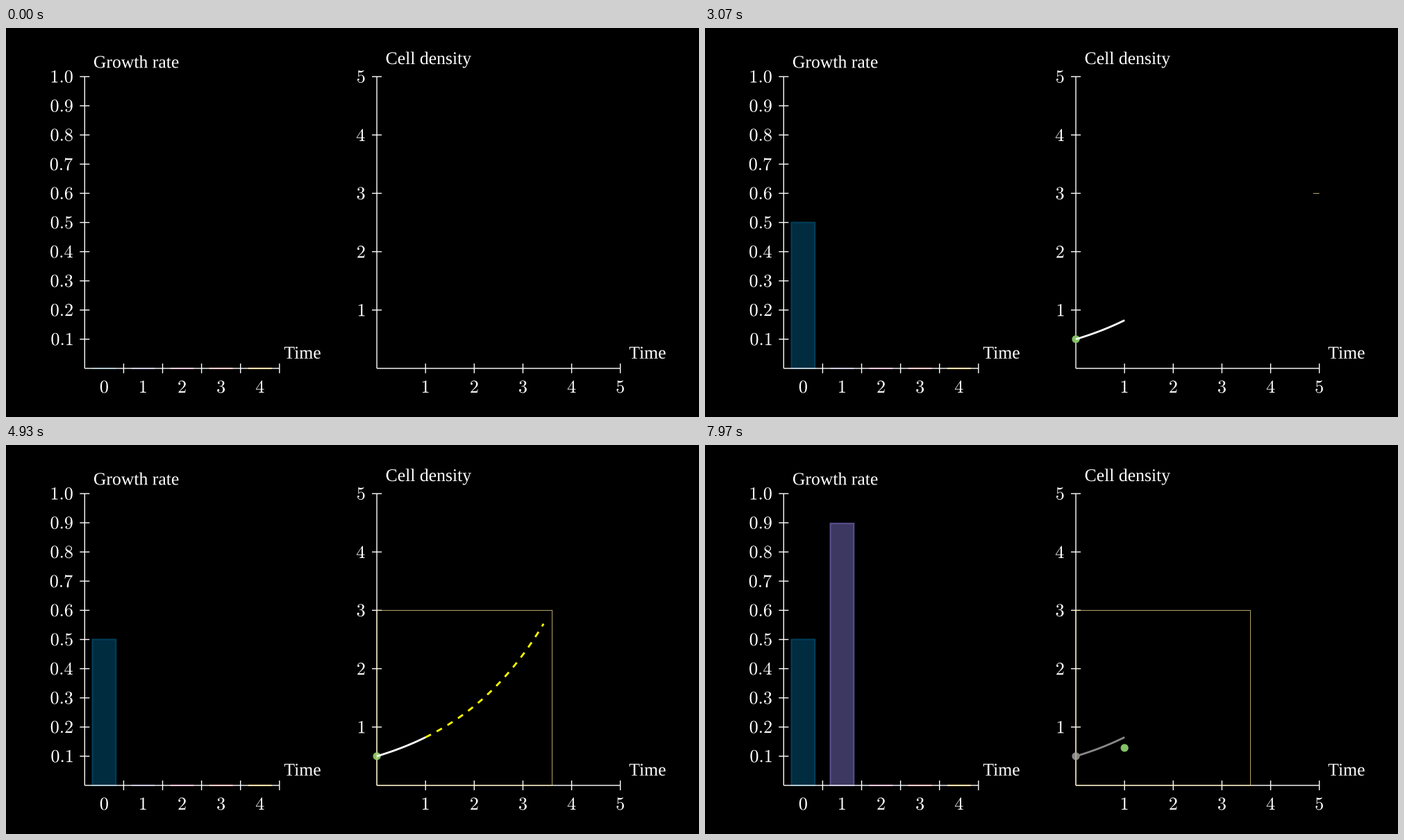
A matplotlib script for the animation above (8000 ms loop, 998 by 561 pixels).

```python
import numpy as np
import matplotlib.pyplot as plt
from matplotlib.animation import FuncAnimation
from matplotlib.collections import LineCollection
from matplotlib.colors import to_rgb
from matplotlib.patches import Circle, PathPatch, Rectangle
from matplotlib.path import Path
from matplotlib.textpath import TextPath

plt.rcParams["mathtext.fontset"] = "cm"

W, H, DPI = 998, 561, 100
UNIT = H / 8                      # one scene unit in pixels
FPS, SECONDS = 30, 8
GREEN, GREY, YELLOW, PALE = "#83C167", "#888888", "#FFFF00", "#FFEA94"
BAR_COLORS = ["#003f5c", "#58508d", "#bc5090", "#ff6361", "#ffa600"]

BASE, TOP = H / 2 + 3 * UNIT, H / 2 - 3 * UNIT
LEFT, RIGHT = W / 2 - 5.5 * UNIT, W / 2 + 0.5 * UNIT
BAR_STEP = 4 * UNIT / 5
RATE, START, LIMIT = 0.5, 0.5, 3
T_END = np.log(LIMIT / START) / RATE   # time at which the density reaches LIMIT

fig = plt.figure(figsize=(W / DPI, H / DPI), dpi=DPI, facecolor="black")
ax = fig.add_axes([0, 0, 1, 1])
ax.set_xlim(0, W)
ax.set_ylim(H, 0)
ax.axis("off")


def stroke(width):
    """Scene stroke width to points."""
    return width * 0.01 * UNIT * 72 / DPI


def smooth(t):
    def sig(x):
        return 1 / (1 + np.exp(-x))
    t = np.clip(t, 0, 1)
    edge = sig(-5)
    return np.clip((sig(10 * (t - 0.5)) - edge) / (1 - 2 * edge), 0, 1)


def plot_xy(t, n):
    """Pixel position in the density chart."""
    return RIGHT + UNIT * np.asarray(t), BASE - 6 * UNIT / 5 * np.asarray(n)


def density(t):
    return START * np.exp(RATE * np.asarray(t))


def mix(a, b, k):
    return tuple((1 - k) * np.array(to_rgb(a)) + k * np.array(to_rgb(b)))


def label(s, x, y, size, anchor):
    """Place text by its inked box; anchor gives the fixed point as (x, y) in 0..1."""
    path = TextPath((0, 0), s, size=size, prop=dict(family="Liberation Serif"))
    box = path.get_extents()
    pts = path.vertices.copy()
    pts[:, 0] += x - (box.x0 + anchor[0] * box.width)
    pts[:, 1] = y + (box.y0 + anchor[1] * box.height) - pts[:, 1]
    ax.add_patch(PathPatch(Path(pts, path.codes), fc="white", lw=0, zorder=3))


def number(s, x, y, anchor):
    label(f"${s}$", x, y, 0.3736 * UNIT, anchor)


def draw_axes():
    tick, gap = 0.1 * UNIT, 0.25 * UNIT
    lines = []
    for x0, length, cols, rows in ((LEFT, 4, 5, 10), (RIGHT, 5, 5, 5)):
        lines.append([(x0, BASE), (x0 + length * UNIT, BASE)])
        lines.append([(x0, BASE), (x0, TOP)])
        for i in range(1, cols + 1):
            x = x0 + i * length * UNIT / cols
            lines.append([(x, BASE - tick), (x, BASE + tick)])
            if x0 == LEFT:
                number(i - 1, x - BAR_STEP / 2, BASE + gap, (0.5, 1))
            else:
                number(i, x, BASE + gap, (0.5, 1))
        for i in range(1, rows + 1):
            y = BASE + (TOP - BASE) * i / rows
            lines.append([(x0 - tick, y), (x0 + tick, y)])
            text = f"{i / 10:.1f}" if rows == 10 else i
            number(text, x0 - gap, y, (1, 0.5))
    ax.add_collection(LineCollection(lines, colors="white", lw=stroke(2),
                                     snap=False, zorder=2))


def draw_titles():
    size = 25.7
    label("Growth rate", LEFT + 13.6, 57.6, size, (0, 0))
    label("Cell density", RIGHT + 13.6, 57.6, size, (0, 0))
    label("Time", LEFT + 4 * UNIT + 7, 476.9, size, (0, 0))
    label("Time", RIGHT + 5 * UNIT + 13, 476.9, size, (0, 0))


def make_bar(i):
    width = 0.6 * BAR_STEP
    x = LEFT + (i + 0.5) * BAR_STEP - width / 2
    bar = Rectangle((x, BASE), width, 0, fc=(*to_rgb(BAR_COLORS[i]), 0.7),
                    ec=BAR_COLORS[i], lw=stroke(3), joinstyle="miter",
                    snap=False, zorder=1)
    return ax.add_patch(bar)


def make_dot(t, n):
    return ax.add_patch(Circle(plot_xy(t, n), 0.08 * UNIT, fc=GREEN, lw=0, zorder=4))


def make_line(color, width, z):
    line, = ax.plot([], [], color=color, lw=stroke(width), snap=False, zorder=z,
                    solid_capstyle="butt", solid_joinstyle="miter")
    return line


draw_axes()
draw_titles()
bars = [make_bar(i) for i in range(5)]
dot = make_dot(0, START)
next_dot = make_dot(1, density(0.5))
next_dot.set_zorder(8)
curve = make_line("white", 4, 5)
box = make_line(PALE, 1, 6)
dashes = ax.add_collection(LineCollection([], colors=YELLOW, lw=stroke(4),
                                          snap=False, zorder=7))

# Arc length along the predicted part of the curve
DASHES = 15
ts = np.linspace(1, T_END, 800)
px, py = plot_xy(ts, density(ts))
arc = np.r_[0, np.cumsum(np.hypot(np.diff(px), np.diff(py)))]
dash_len = arc[-1] * 0.5 / DASHES
dash_step = dash_len + arc[-1] * 0.5 / (DASHES - 1)


def dash_segments(drawn, erased):
    """Dashes appear one after another and vanish in the same order."""
    segments = []
    for i in range(DASHES):
        part = smooth(drawn * DASHES - i) * smooth(1 - (erased * DASHES - i))
        if part > 0.01:
            s = i * dash_step + np.linspace(0, part * dash_len, 8)
            segments.append(np.c_[np.interp(s, arc, px), np.interp(s, arc, py)])
    return segments


def box_outline(right, drawn):
    """Outline from the top right corner, counter-clockwise; each side takes a quarter."""
    xs, ys = plot_xy([right, 0, 0, right, right], [LIMIT, LIMIT, 0, 0, LIMIT])
    k = np.arange(5)
    end = 4 * drawn
    keep = np.r_[k[k < end], end]
    return np.interp(keep, k, xs), np.interp(keep, k, ys)


def update(frame):
    now = frame / FPS

    def step(start):
        return np.clip(now - start, 0, 1)

    dot.set_alpha(smooth(step(0)))
    bars[0].set_height(-0.5 * 6 * UNIT * smooth(step(1)))

    t = np.linspace(0, smooth(step(2)), 40)
    curve.set_data(*plot_xy(t, density(t)))
    curve.set_visible(now > 2)

    right = 5 + (T_END - 5) * smooth(step(4))
    box.set_data(*box_outline(right, smooth(step(3))))
    box.set_visible(now > 3)

    dashes.set_segments(dash_segments(step(4), step(5)))

    fade = smooth(step(6))
    curve.set_color(mix("white", GREY, fade))
    dot.set_facecolor(mix(GREEN, GREY, fade))
    next_dot.set_alpha(fade)

    bars[1].set_height(-0.9 * 6 * UNIT * smooth(step(7)))
    return []


anim = FuncAnimation(fig, update, frames=FPS * SECONDS, interval=1000 / FPS,
                     repeat=True, repeat_delay=0)
plt.show()
```
